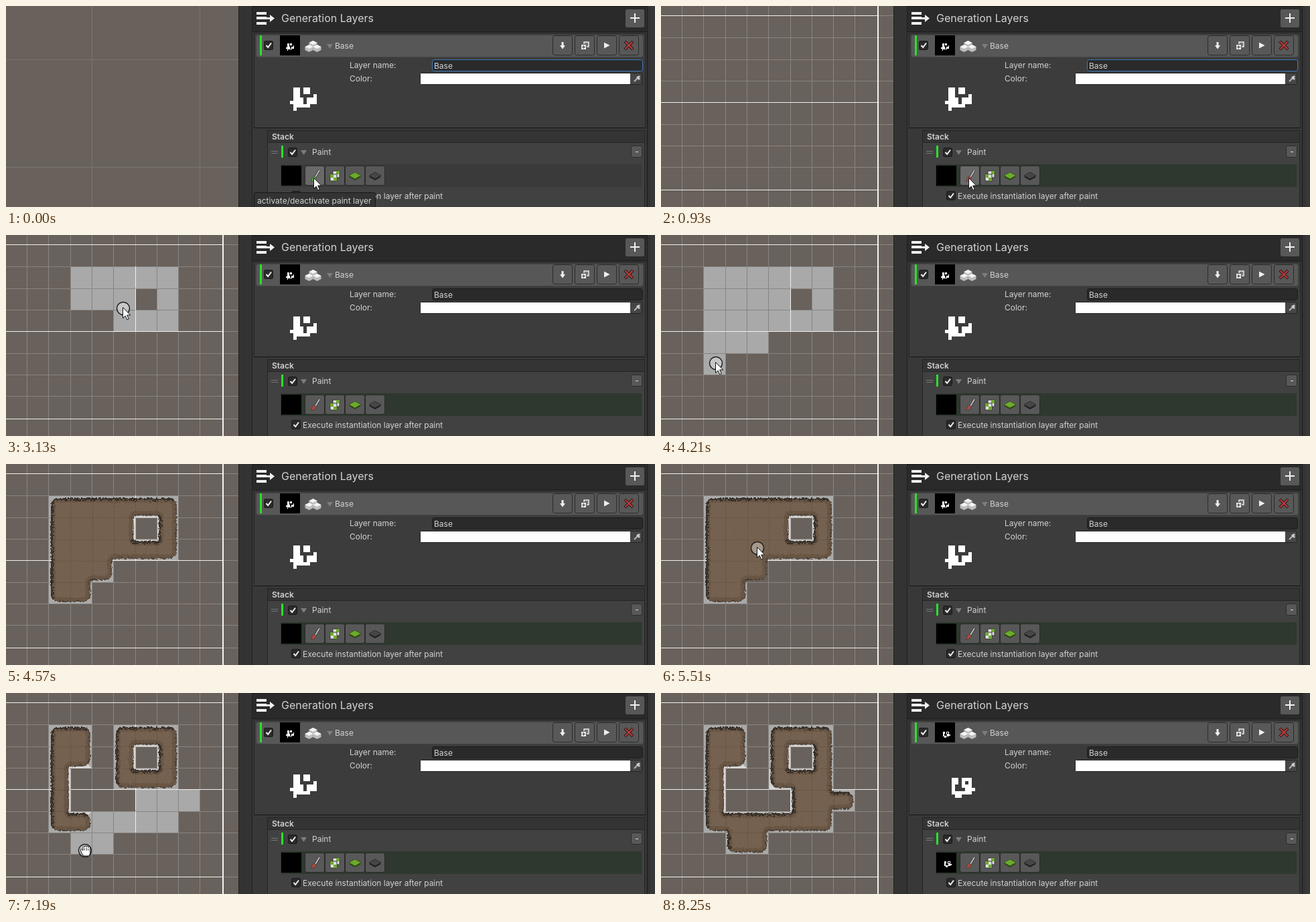
Recreate the animation shown at these times as an HTML page with a canvas. Size 969 px wide and 301 px high, loop 8920 ms.

```html
<!DOCTYPE html>
<html lang="en">
<head>
<meta charset="utf-8">
<title>Layer painting</title>
<style>
  html, body { margin: 0; width: 100%; height: 100%; overflow: hidden; background: #383838; }
  canvas, svg { position: absolute; left: 0; top: 0; display: block; }
  text { font: 12px Inter, Roboto, sans-serif; fill: #d2d2d2; white-space: pre; }
  .btn { fill: #585858; stroke: #2b2b2b; }
  .box { fill: #2a2a2a; stroke: #191919; }
  .tick { fill: none; stroke: #f0f0f0; stroke-width: 2; }
</style>
</head>
<body>
<canvas id="scene" width="347" height="301"></canvas>
<svg id="ui" width="969" height="301" viewBox="0 0 969 301">
  <defs>
    <g id="check"><rect class="box" x=".5" y=".5" width="13" height="13" rx="2"/><path class="tick" d="M3.5 7l2.700 3 4.800-6.500"/></g>
    <path id="fold" d="M0 0h9l-4.500 7z" fill="#7d7d7d"/>
    <g id="cube"><path d="M0-5L6-2V3L0 6L-6 3V-2z" fill="#bdbdbd"/><path d="M0-5L6-2L0 1L-6-2z" fill="#f4f4f4"/></g>
    <path id="tile" d="M-9 0L0-5L9 0L0 5z"/>
  </defs>

  <!-- frame -->
  <rect x="347" width="622" height="301" fill="#333"/>
  <path d="M347.500 0v301M367.500 0v301" stroke="#202020"/>
  <rect x="368" width="588" height="301" fill="#383838"/>
  <rect x="368" y="1" width="588" height="37" fill="#2a2a2a"/>
  <path d="M368 .5h589M368 38.500h589M957.500 0v301" stroke="#1b1b1b"/>
  <rect x="962" width="7" height="301" fill="#383838"/>

  <!-- header -->
  <g fill="#f0f0f0"><path d="M374 9h15v4h-15zM374 16h15v4h-15zM374 24h15v4h-15z"/><path d="M387 17h7v-4l7 5.500-7 5.500v-4h-7z"/></g>
  <text x="411" y="24" style="font-size:16px">Generation Layers</text>
  <rect class="btn" x="924.500" y="4.500" width="29" height="28" rx="3"/>
  <path d="M932 18h14M939 11v14" stroke="#f0f0f0" stroke-width="2"/>

  <!-- layer -->
  <rect x="370.500" y="40.500" width="584" height="142" fill="#3c3c3c" stroke="#242424"/>
  <rect x="373.500" y="43.500" width="578" height="33" rx="3" fill="#575757" stroke="#444"/>
  <path d="M371 182.500h583" stroke="#151515"/>
  <rect x="379" y="44" width="3" height="30" fill="#2be02b"/>
  <use href="#check" x="385" y="52"/>
  <rect x="409" y="44" width="30" height="30"/>
  <use href="#cube" x="458.500" y="57"/><use href="#cube" x="452.500" y="63"/><use href="#cube" x="464.500" y="63"/>
  <use href="#fold" x="479" y="57"/>
  <text x="491" y="64">Base</text>
  <g class="btn"><rect x="816.500" y="44.500" width="29" height="29" rx="3"/><rect x="849.500" y="44.500" width="29" height="29" rx="3"/><rect x="882.500" y="44.500" width="29" height="29" rx="3"/><rect x="915.500" y="44.500" width="29" height="29" rx="3"/></g>
  <path d="M829.500 54h3v5h2.500l-4 5.500-4-5.500h2.500z" fill="#f0f0f0"/>
  <path d="M863 54h7v7h-7z" fill="#777" stroke="#e8e8e8" stroke-width="1.500"/><path d="M858.500 57.500h8v8h-8z" fill="#eee" stroke="#555"/><path d="M860 61.500h5M862.500 59v5" stroke="#444"/>
  <path d="M893 54.500l8.500 4.500-8.500 4.500z" fill="#f0f0f0"/>
  <path d="M924 53l12 12M936 53l-12 12" stroke="#2a1717" stroke-width="4"/><path d="M924.500 53.500l11 11M935.500 53.500l-11 11" stroke="#c23b3b" stroke-width="2"/>
  <text x="513" y="93">Layer name:</text>
  <text x="513" y="113">Color:</text>
  <rect id="field" x="636.500" y="80.500" width="314" height="17" rx="3" fill="#2a2a2a"/>
  <text x="639" y="94">Base</text>
  <rect x="618.500" y="100.500" width="331" height="17" rx="2" fill="#464646" stroke="#222"/>
  <rect x="619" y="101" width="313" height="16" fill="#fff"/>
  <path d="M938 113l5-5" stroke="#b8b8b8" stroke-width="2"/><path d="M942 106l4 4M943 108l3-3" stroke="#d0d0d0" stroke-width="2.500"/>

  <!-- stack -->
  <rect x="390.500" y="186.500" width="563" height="130" fill="#414141" stroke="#242424"/>
  <rect x="391" y="187" width="562" height="17" fill="#343434"/>
  <path d="M391 204.500h562" stroke="#242424"/>
  <text x="397" y="200" style="font-weight:600">Stack</text>
  <path d="M396 217.500h10M396 220.500h10" stroke="#777"/>
  <rect x="411" y="209" width="3" height="18" fill="#2be02b"/>
  <use href="#check" x="421" y="212"/>
  <use href="#fold" x="440" y="216"/>
  <text x="457" y="223">Paint</text>
  <rect class="btn" x="933.500" y="209.500" width="16" height="17" rx="3"/><path d="M940 218.500h4" stroke="#ddd"/>
  <rect id="row" x="410" y="237" width="539" height="34"/>
  <rect x="411" y="239" width="30" height="30"/>
  <g class="btn"><rect id="brushBtn" x="446.500" y="239.500" width="29" height="29" rx="3"/><rect x="476.500" y="239.500" width="29" height="29" rx="3"/><rect x="506.500" y="239.500" width="29" height="29" rx="3"/><rect x="536.500" y="239.500" width="29" height="29" rx="3"/></g>
  <path d="M468 246l-6 10" stroke="#333" stroke-width="3.500"/><path d="M468 246l-6 10" stroke="#c4c4c4" stroke-width="1.800"/>
  <path id="tip" d="M459.500 255l3.500 2.500c-1 4-4 5-8 5 2.500-2 1.500-6 4.500-7.500z" stroke="#333" stroke-width=".6"/>
  <path d="M488 247h10v10h-10z" fill="#e0e0e0" stroke="#333"/><path d="M493 247h5v5h-5zM488 252h5v5h-5z" fill="#6fa92f"/>
  <path d="M484 252h10v10h-10z" fill="#e0e0e0" stroke="#333"/><path d="M484 252h5v5h-5zM489 257h5v5h-5z" fill="#6fa92f"/>
  <use href="#tile" x="521" y="256" fill="#2c4712"/><use href="#tile" x="521" y="254" fill="#6cab2c" stroke="#2c4712" stroke-width=".7"/>
  <use href="#tile" x="551" y="256" fill="#1d1d1d"/><use href="#tile" x="551" y="254" fill="#464646" stroke="#222" stroke-width=".7"/>
  <use href="#check" x="426" y="277"/>
  <text x="443" y="289">Execute instantiation layer after paint</text>
  <g id="thumbs" fill="#fff"></g>
  <g id="tooltip"><rect x="370.500" y="279.500" width="181" height="24" rx="2" fill="#333" stroke="#191919"/><text x="375" y="296">activate/deactivate paint layer</text></g>

  <!-- pointer -->
  <circle id="ring" r="9.500" fill="rgba(255,255,255,.35)" stroke="#1e1e1e" stroke-width="1.500"/>
  <path id="arrow" d="M.5.500V16.500L4.200 13L6.800 18.800L9.200 17.700L6.700 12H11.800z" fill="#fff" stroke="#111"/>
  <g id="hand" fill="#fff" stroke="#111" stroke-linejoin="round"><path d="M-7-1.500c1.500-1.500 3 0 4 1.500v-5c0-2 2.400-2 2.600 0 0-3 2.600-3 2.800 0 .4-2.400 2.700-2 2.700.4.600-1.800 2.600-1.400 2.600.6V4L6 8H-2L-5 4z"/><path d="M-.3-4v4M2.500-4v4M5.100-3v3" stroke-width=".8"/></g>
</svg>
<script>
const LOOP = 8920, CELL = 32.27, LEFT = 63.45, TOP = 47.45;
const $ = id => document.getElementById(id);
const ctx = $('scene').getContext('2d');
const edge = (o, i) => Math.round(o + CELL * i);

// time, x, y, pointer (a arrow, h hand, capital adds the ring), cells as column+row, minus erases
const steps = [
  [0, 459, 257, 'a'], [1330, 350, 215, 'a'], [1450, 235, 168, 'a'],
  [1600, 188, 147, 'a'], [1720, 142, 126, 'a'], [1840, 101, 110, 'h'], [1960, 54, 101, 'h'],
  [2110, 60, 100, 'A'], [2230, 110, 94, 'A', '11 10'], [2350, 143, 92, 'A', '20 21'],
  [2470, 176, 104, 'A', '31'], [2590, 196, 124, 'A', '32 42'], [2710, 238, 122, 'A', '52'],
  [2830, 241, 96, 'A', '51'], [2980, 219, 62, 'A', '50'], [3130, 175, 110, 'A', '40 30'],
  [3250, 140, 113, 'A'], [3370, 107, 108, 'A'], [3520, 82, 68, 'A', '00 01'],
  [3640, 117, 109, 'A', '02 12'], [3790, 136, 122, 'A'], [3940, 114, 157, 'A', '22 23 13'],
  [4090, 80, 162, 'A', '03'], [4210, 82, 192, 'A', '04'], [4330, 110, 194, 'A', '14'],
  [4450, 33, 257, 'a'], [4570, 0, 0, ''], [4850, 158, 240, 'a'],
  [5000, 175, 205, 'a'], [5120, 148, 163, 'A', '-23'], [5240, 112, 160, 'A', '-13'],
  [5390, 110, 128, 'A', '-12'], [5510, 144, 126, 'A', '-22'], [5630, 145, 94, 'A', '-21'],
  [5750, 146, 64, 'A', '-20'], [5900, 169, 192, 'a'], [6020, 176, 191, 'a'],
  [6140, 180, 189, 'a'], [6260, 185, 187, 'a'], [6410, 196, 178, 'a'], [6530, 208, 158, 'A', '43'],
  [6680, 240, 160, 'A', '53'], [6800, 270, 162, 'A', '63'], [6920, 238, 194, 'A', '54'],
  [7040, 176, 195, 'A', '44 34'], [7190, 118, 236, 'H', '24 15 25'],
  [7340, 88, 249, 'a'], [7460, 62, 255, 'a'], [7580, 48, 259, 'a'],
  [7980, 137, 283, 'a'], [8100, 0, 0, '']
];
const builds = [4450, 5750, 7580];
const marks = [810, 930, 2110, 8250];

function cellsAt(t) {
  const set = new Set();
  for (const [at, , , , ops] of steps) {
    if (at > t || !ops) continue;
    for (const op of ops.split(' ')) op[0] === '-' ? set.delete(op.slice(1)) : set.add(op);
  }
  return set;
}

function hash(x, y) {
  const s = Math.sin(x * 127.1 + y * 311.7) * 43758.5453;
  return s - Math.floor(s);
}

// An empty cell with painted ground on most sides
function enclosed(has, c, r) {
  if (has(c, r)) return false;
  const seen = [[1, 0], [-1, 0], [0, 1], [0, -1]].filter(([dx, dy]) =>
    [1, 2, 3, 4, 5].some(k => has(c + dx * k, r + dy * k))).length;
  return seen === 4 || seen === 3 && r > 1;
}

// Ground with rounded, ragged, rocky borders, coloured by distance to the rim
function makeGround(set) {
  const w = 226, h = 194, cv = document.createElement('canvas');
  cv.width = w; cv.height = h;
  const g = cv.getContext('2d'), img = g.createImageData(w, h);
  const has = (c, r) => set.has('' + c + r), R = 14;
  for (let y = 0; y < h; y++) for (let x = 0; x < w; x++) {
    const c = Math.floor(x / CELL), r = Math.floor(y / CELL);
    if (!has(c, r)) continue;
    const px = x - c * CELL + .5, py = y - r * CELL + .5, qx = CELL - px, qy = CELL - py;
    const sides = [[-1, 0, px], [0, -1, py], [1, 0, qx], [0, 1, qy]]
      .map(([i, j, d]) => has(c + i, r + j) ? 99 : d);
    const dx = Math.min(sides[0], sides[2]), dy = Math.min(sides[1], sides[3]);
    let d = Math.min(dx, dy) > R ? Math.min(dx, dy)
      : R - Math.hypot(Math.max(R - dx, 0), Math.max(R - dy, 0));
    let lit = Math.min(sides[2], sides[3]) < Math.min(sides[0], sides[1]);
    let out = [[-1, 0], [0, -1], [1, 0], [0, 1]][sides.indexOf(Math.min(...sides))];
    for (const i of [-1, 1]) for (const j of [-1, 1]) {
      if (has(c + i, r + j)) continue;
      const e = Math.hypot(i < 0 ? px : qx, j < 0 ? py : qy);
      if (e < d) { d = e; lit = i + j > 0; out = [i, j]; }
    }
    const n = hash(x, y), n2 = hash(x >> 1, y >> 1);
    const depth = d - 1.8 - n2 * 2;
    let col;
    if (depth < 0) {
      if (d > 2.2 || !enclosed(has, c + out[0], r + out[1])) continue;
      col = [214, 213, 211];
    } else if (depth < (lit ? .6 : 2.6) + n2 * 2.2) {
      const k = n * 40 + (lit ? 32 : 8);
      col = [30 + k, 26 + k * .88, 23 + k * .74];
    } else {
      const k = (depth < 7 ? -11 : 0) + (n - .5) * 5;
      col = [117 + k, 97 + k, 79 + k];
    }
    img.data.set([...col, 255], (y * w + x) * 4);
  }
  g.putImageData(img, 0, 0);
  // faint cell seams on the ground only
  g.globalCompositeOperation = 'source-atop';
  g.fillStyle = 'rgba(50,38,28,.16)';
  for (let i = 1; i < 7; i++) {
    g.fillRect(edge(0, i), 0, 1, h);
    g.fillRect(0, edge(0, i), w, 1);
  }
  return cv;
}
const grounds = builds.map(t => makeGround(cellsAt(t)));

function lines(xs, ys, color, size = 1, width = 347) {
  ctx.fillStyle = color;
  xs.forEach(x => ctx.fillRect(x, 0, size, 301));
  ys.forEach(y => ctx.fillRect(0, y, width, size));
}

function drawScene(t) {
  ctx.fillStyle = '#69615b';
  ctx.fillRect(0, 0, 347, 301);
  if (t < 810) return lines([128, 289], [80, 241], '#7b7670');
  const cells = [...cellsAt(t)].map(k => [+k[0], +k[1]]);
  ctx.fillStyle = '#a9a9a9';
  for (const [c, r] of cells) {
    const x = edge(LEFT, c), y = edge(TOP, r);
    ctx.fillRect(x, y, edge(LEFT, c + 1) - x, edge(TOP, r + 1) - y);
  }
  const idx = [-1, 0, 1, 2, 3, 4, 5, 6, 7];
  lines(idx.map(i => edge(LEFT, i)), [14, 275, ...idx.slice(1, 8).map(i => edge(TOP, i))], '#888582');
  lines([], [14, 144, 275], '#f0f0f0', 1, 324);
  lines([323], [], '#f4f4f4', 2);
  ctx.fillStyle = '#f0f0f0';
  for (const [c, r] of cells) if (c === 3 || c === 4) ctx.fillRect(edge(LEFT, 4), edge(TOP, r), 1, 32);
  const n = builds.filter(b => b <= t).length;
  if (n) ctx.drawImage(grounds[n - 1], Math.ceil(LEFT), Math.ceil(TOP));
}

const oldMap = ['.11.11..', '.11.11..', '.11....1', '.111.111', '1111.111', '.11111..', '.1......'];
const newMap = ['', ...Array.from({ length: 6 }, (_, r) =>
  '..' + Array.from({ length: 7 }, (_, c) => cellsAt(LOOP).has('' + c + r) ? 1 : '.').join(''))];

function mapPath(map, x, y, s) {
  let d = '';
  map.forEach((row, j) => [...row].forEach((v, i) => {
    if (v === '1') d += `M${x + i * s} ${y + j * s}h${s}v${s}h${-s}z`;
  }));
  return `<path shape-rendering="crispEdges" d="${d}"/>`;
}

function drawPanel(t) {
  const on = t >= 810, done = t >= 8250, map = done ? newMap : oldMap;
  $('row').setAttribute('fill', on ? '#2e382e' : '#3a3a3a');
  $('tip').setAttribute('fill', on ? '#b8473d' : '#4fae35');
  $('brushBtn').style.fill = t < 1330 ? '#696969' : '#585858';
  $('field').setAttribute('stroke', t < 2110 ? '#3a79bb' : '#1c1c1c');
  $('tooltip').style.display = on ? 'none' : '';
  $('thumbs').innerHTML = mapPath(map, 424, 122, 5) + mapPath(map, 418, 56, 1.5) +
    (done ? mapPath(map, 420, 250, 1.5) : '');
}

function drawPointer([, x, y, kind]) {
  const put = (id, show, px, py) => {
    $(id).style.display = show ? '' : 'none';
    $(id).setAttribute('transform', `translate(${px} ${py})`);
  };
  const ring = kind === 'A' || kind === 'H';
  put('ring', ring, x, y);
  put('arrow', /a/i.test(kind), x - ring, y - 2 * ring);
  put('hand', /h/i.test(kind), x, y);
}

const times = [...new Set([...steps.map(s => s[0]), ...marks])].sort((a, b) => a - b);
let last = -1;
function frame() {
  const t = performance.now() % LOOP;
  const key = times.filter(v => v <= t).pop();
  if (key !== last) {
    last = key;
    drawScene(key);
    drawPanel(key);
    drawPointer(steps.filter(s => s[0] <= key).pop());
  }
  requestAnimationFrame(frame);
}
frame();
</script>
</body>
</html>
```
